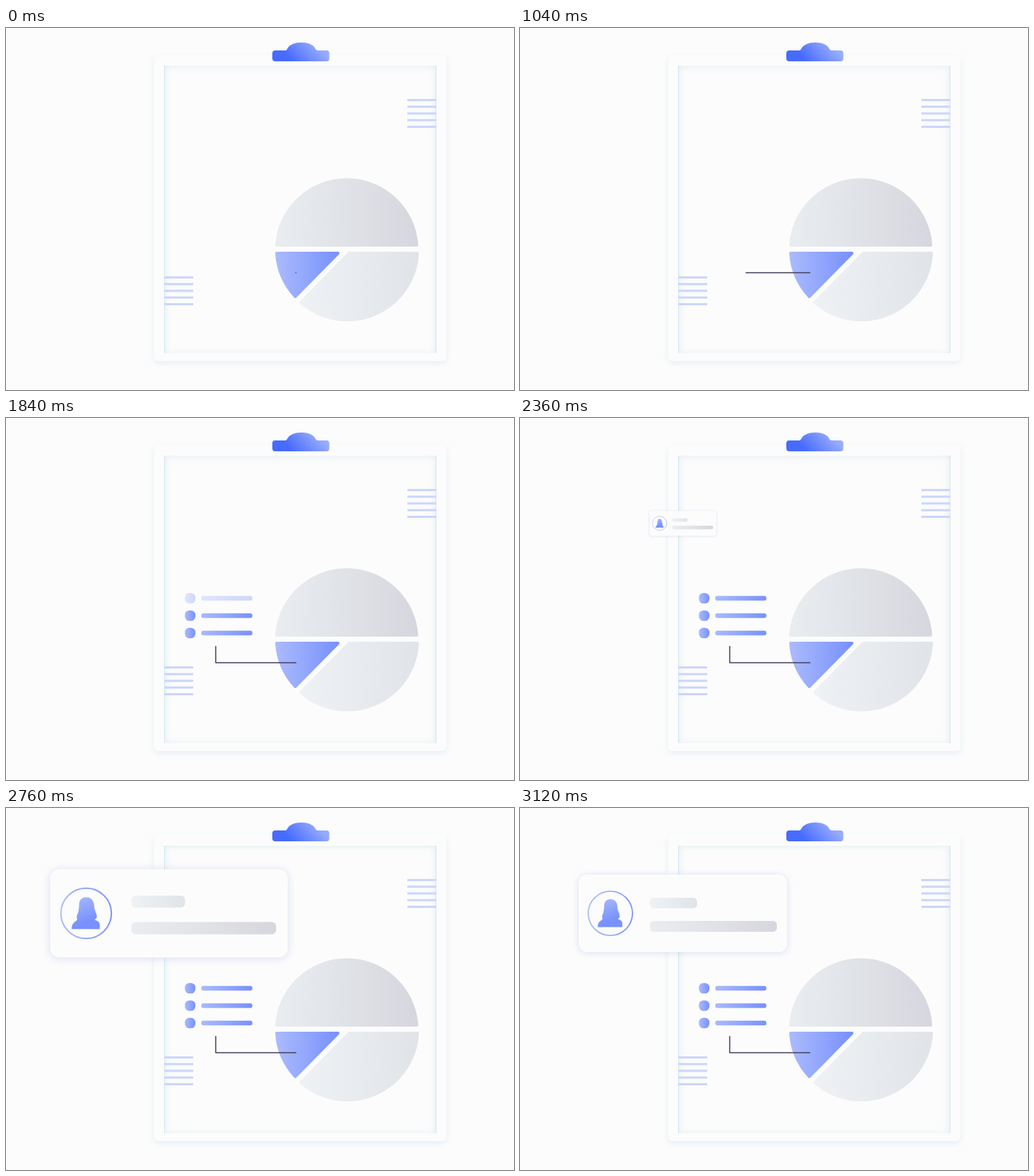
An HTML page that plays this animation: 700x500 px, repeating every 5000 ms.

```html
<!DOCTYPE html>
<html lang="en">
<head>
<meta charset="utf-8">
<title>Report board</title>
<style>
  html, body { margin: 0; width: 100%; height: 100%; overflow: hidden; background: #fcfcfc; }
  #stage { position: relative; width: 700px; height: 500px; overflow: hidden; }
  #board, #sheet { position: absolute; box-sizing: border-box; background: #fcfcfc; }
  #board {
    left: 204px; top: 37px; width: 403px; height: 423px; border-radius: 6px;
    box-shadow: 0 3px 8px rgba(170, 205, 230, .27);
  }
  #sheet {
    left: 218px; top: 52px; width: 375px; height: 397px;
    border: solid #cfe6ee; border-width: 0 1px;
    box-shadow: inset 0 1px 11px rgba(165, 200, 225, .27);
  }
  svg { position: absolute; left: 0; top: 0; }
  .slice { stroke-width: 4; stroke-linejoin: round; }
  #cardBack { fill: #fcfcfc; filter: drop-shadow(0 1px 5px rgba(150, 165, 230, .34)); }
</style>
</head>
<body>
<div id="stage">
  <div id="board"></div>
  <div id="sheet"></div>
  <svg width="700" height="500" viewBox="0 0 700 500">
    <defs>
      <linearGradient id="blue"><stop stop-color="#aabafd"/><stop offset="1" stop-color="#7891fc"/></linearGradient>
      <linearGradient id="blueDown" x2=".3" y2="1"><stop stop-color="#aabafd"/><stop offset=".85" stop-color="#7891fc"/></linearGradient>
      <linearGradient id="gray"><stop stop-color="#e9edf0"/><stop offset="1" stop-color="#d6d7de"/></linearGradient>
      <linearGradient id="pale"><stop stop-color="#eff2f5"/><stop offset="1" stop-color="#e0e4e8"/></linearGradient>
      <linearGradient id="clip" gradientUnits="userSpaceOnUse" x1="394" y1="46" x2="424" y2="18">
        <stop stop-color="#466bfd"/><stop offset="1" stop-color="#98acfd"/>
      </linearGradient>
    </defs>

    <path fill="url(#clip)" d="M371 31H385Q387 31 388 28Q393 20 407 20Q421 20 426 28Q427 31 430 31H441.500Q445.500 31 445.500 35V42Q445.500 46 441.500 46H371Q367 46 367 42V35Q367 31 371 31Z"/>
    <path id="stripes" stroke="#ccd6fc" stroke-width="2.8"/>

    <path class="slice" fill="url(#gray)" stroke="url(#gray)" d="M373 300A96.700 96.700 0 0 1 566 300Z"/>
    <path class="slice" fill="url(#pale)" stroke="url(#pale)" d="M473 311H567A97 97 0 0 1 406 379Z"/>
    <path class="slice" fill="url(#blue)" stroke="url(#blue)" d="M373 311H457.500L398.500 371A97 97 0 0 1 373 311Z"/>

    <path id="leader" fill="none" stroke="#484360" stroke-width="1.500" stroke-linecap="round" stroke-linejoin="round"/>
    <g id="items" fill="url(#blue)"></g>

    <g id="card">
      <rect id="cardBack" x="81" y="92" width="287" height="107" rx="11"/>
      <circle cx="124.500" cy="145.500" r="30.500" fill="none" stroke="url(#blue)" stroke-width="1.700"/>
      <path fill="url(#blueDown)" d="M117 130Q119 126 125 126Q132 126 134 134Q134 140 136 144Q138 149 137 151.500Q134 153 136 154Q141 155 141 160V164.500H107Q107 158 112 155Q115 153 113 151Q113 148 115 144Q116 139 116 135Q116 132 117 130Z"/>
      <rect x="179" y="124" width="65" height="14.500" rx="5" fill="url(#pale)"/>
      <rect x="179" y="156" width="175" height="15" rx="5.500" fill="url(#gray)"/>
    </g>
  </svg>
</div>
<script>
const LOOP = 5000;
const byId = id => document.getElementById(id);
const progress = (t, start, end) => Math.min(1, Math.max(0, (t - start) / (end - start)));
const ease = p => (1 - Math.cos(Math.PI * p)) / 2;

const stripeRows = (x, y) =>
  Array.from({ length: 5 }, (_, i) => `M${x} ${y + i * 9.25}h40`).join('');
byId('stripes').setAttribute('d', stripeRows(218, 344.5) + stripeRows(553, 99.5));

// Listed bottom to top, in order of appearance
byId('items').innerHTML = [297, 273, 249].map(y => `<g>
  <rect x="246.5" y="${y - 7.25}" width="14.500" height="14.500" rx="6.300"/>
  <rect x="269" y="${y - 3.25}" width="70.500" height="6.500" rx="3"/></g>`).join('');
const items = [...byId('items').children];

function draw(t) {
  const x = 399.5 - 110.5 * progress(t, 0, 1306);
  const rise = 22.5 * progress(t, 1306, 1360);
  byId('leader').setAttribute('d', `M399.5 338H${x}` + (rise ? `v${-rise}` : ''));

  items.forEach((item, i) => {
    const start = 1480 + i * 160;
    item.setAttribute('opacity', progress(t, start, start + 120));
  });

  const scale = 1.15 * ease(progress(t, 2120, 2800)) - 0.15 * ease(progress(t, 2800, 3120));
  const card = byId('card');
  card.style.display = scale > 0 ? '' : 'none';
  card.setAttribute('transform', `translate(224.5 145.5) scale(${scale}) translate(-224.5 -145.5)`);
}

const began = performance.now();
function tick() {
  draw((performance.now() - began) % LOOP);
  requestAnimationFrame(tick);
}
tick();
</script>
</body>
</html>
```
